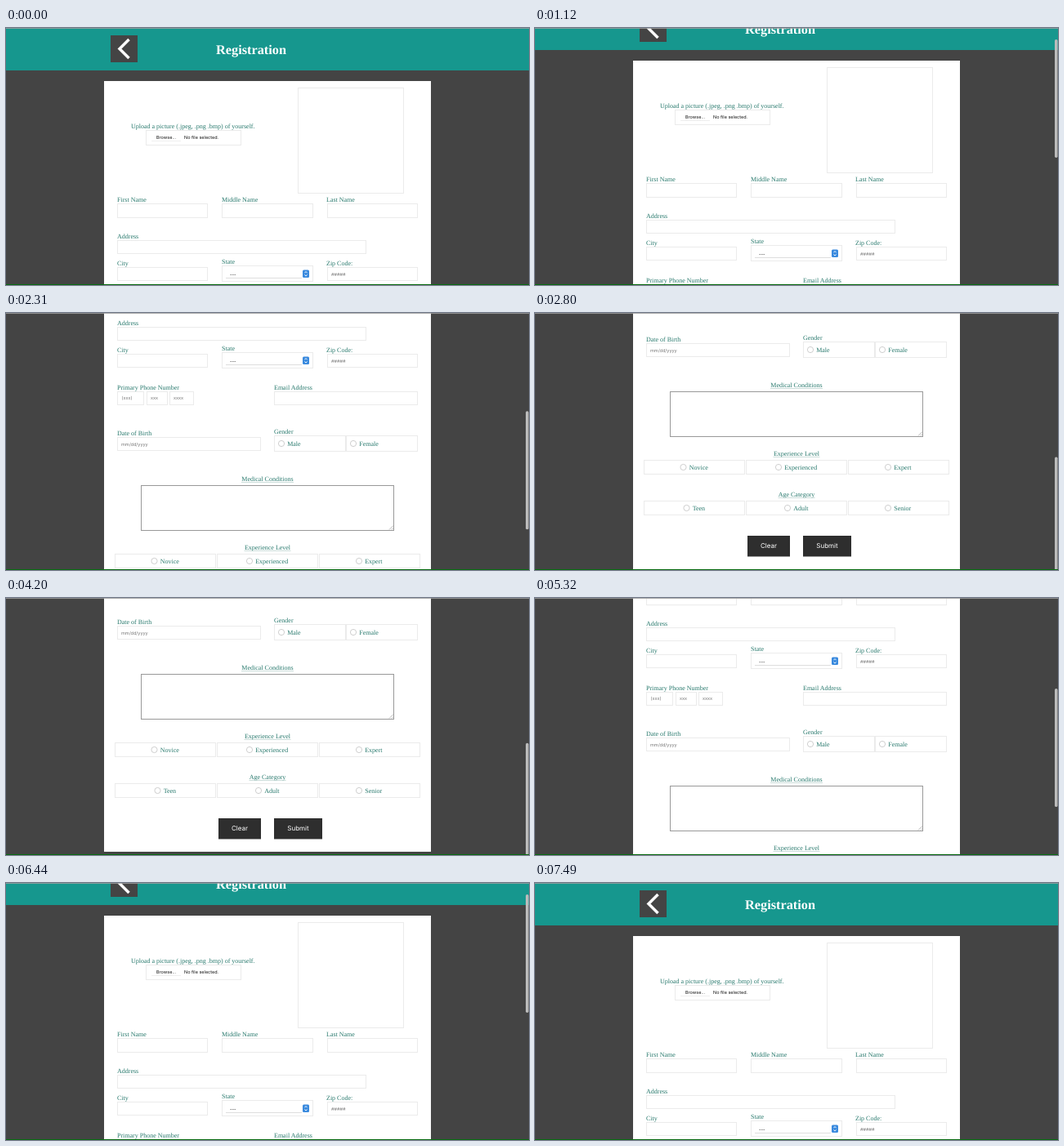
These frames come from a looping animation (640x315 px, 7560 ms). An HTML page:

```html
<!DOCTYPE html>
<html lang="en">
<head>
<meta charset="utf-8">
<title>Registration form</title>
<style>
  html, body { margin: 0; height: 100%; overflow: hidden; background: #444; }
  svg { display: block; width: 640px; height: 315px; text-rendering: geometricPrecision; }
  .label { font: 8px "Liberation Serif", serif; fill: #28796d; }
  .title { font: bold 16.3px "Liberation Serif", serif; fill: #fff; }
  .ui { font: 5.5px Inter, sans-serif; fill: #111; }
  .hint { font: 5.5px Inter, sans-serif; fill: #777; }
  .button { font: 8px Inter, sans-serif; fill: #fff; }
  .mid { text-anchor: middle; }
  .box { fill: none; stroke: #ebebeb; }
</style>
</head>
<body>
<svg viewBox="0 0 640 315">
  <rect width="640" height="315" fill="#444"/>
  <g id="page">
    <rect width="640" height="52" fill="#16978e"/>
    <rect x="128" y="9" width="33" height="33" fill="#444"/>
    <path d="M150.500 14 139 25.500 150.500 37" fill="none" stroke="#fff" stroke-width="3.500"/>
    <rect x="120" y="65" width="400" height="607" fill="#fff"/>
  </g>
  <rect id="thumb" x="636" width="3.500" height="145" rx="1.700" fill="#bcbcbc"/>
  <rect width="640" height="1" fill="#a0a0a0" opacity=".8"/>
  <rect y="314" width="640" height="1" fill="#086b10"/>
</svg>
<script>
const page = document.getElementById('page');
const thumb = document.getElementById('thumb');

function add(tag, attrs, content = '') {
  const el = document.createElementNS('http://www.w3.org/2000/svg', tag);
  for (const key in attrs) el.setAttribute(key, attrs[key]);
  el.textContent = content;
  page.append(el);
}
const text = (cls, x, y, content) => add('text', { class: cls, x, y }, content);
const label = (x, y, content) => text('label', x, y, content);
const hint = (x, y, content) => text('hint', x, y, content);
const box = (left, top, right, bottom, extra) => add('rect', {
  class: 'box', x: left + .5, y: top + .5, width: right - left - 1, height: bottom - top - 1, ...extra
});
const path = (d, stroke, width = 1) => add('path', { d, stroke, 'stroke-width': width, fill: 'none' });

function radio(x, y, name) {
  add('circle', { cx: x, cy: y, r: 3.6, fill: '#fff', stroke: '#bbb', 'stroke-width': .7 });
  label(x + 7.2, y + 3, name);
}
function heading(y, content, halfWidth) {
  text('label mid', 320, y, content);
  path(`M${320 - halfWidth} ${y + 1.5}h${halfWidth * 2}`, '#b5cfcb', .7);
}
function choices(top, items) {
  items.forEach(([x, name], i) => {
    box(133 + i * 125, top, 257 + i * 125, top + 18);
    radio(x, top + 9, name);
  });
}
function button(left, right, name) {
  add('rect', { x: left, y: 631, width: right - left, height: 25.5, fill: '#2e2e2e' });
  text('button mid', (left + right) / 2, 646.4, name);
}

text('title mid', 300, 32, 'Registration');

// Picture upload
label(153, 122.5, 'Upload a picture (.jpeg, .png .bmp) of yourself.');
box(171, 125, 288, 144);
path('M178 138.500h36', '#eee');
text('ui', 184, 136, 'Browse...');
text('ui', 218, 136, 'No file selected.');
box(357, 73, 487, 203);

// Name and address
[[136, 'First Name'], [264, 'Middle Name'], [392, 'Last Name']].forEach(([x, name], i) => {
  label(x, 213, name);
  box([136, 264, 393][i], 215, [247, 376, 504][i], 233);
});
label(136, 257.5, 'Address');
box(136, 260, 441, 277);
label(136, 290.5, 'City');
box(136, 293, 247, 310);
label(264, 288.8, 'State');
box(264, 291, 376, 311);
path('M269 306.500h93', '#ddd');
text('ui', 274, 303.5, '---');
add('rect', { x: 363, y: 296.5, width: 8, height: 9.5, rx: 1.5, fill: '#3a8ade' });
path('M365.500 300.200l1.500-1.700 1.500 1.700M365.500 302.400l1.500 1.700 1.500-1.700', '#fff', .9);
label(392, 290.5, 'Zip Code:');
box(393, 293, 504, 310);
hint(398, 303.7, '#####');

// Contact
label(136, 336.7, 'Primary Phone Number');
[[136, 169, 141.5, '(xxx)'], [172, 198, 177, 'xxx'], [200, 230, 205, 'xxxx']].forEach(([left, right, x, name]) => {
  box(left, 339, right, 356);
  hint(x, 349.2, name);
});
label(328, 336.7, 'Email Address');
box(328, 339, 504, 356);

// Personal details
label(136, 392.7, 'Date of Birth');
box(136, 395, 312, 412);
hint(141, 405.5, 'mm/dd/yyyy');
label(328, 391.2, 'Gender');
box(328, 393, 416, 413);
box(416, 393, 504, 413);
radio(337, 403, 'Male');
radio(425, 403, 'Female');

heading(449, 'Medical Conditions', 32);
box(165, 454, 475, 510, { style: 'stroke:#999' });
path('M469 508.500l5-5M472 508.500l2-2', '#999', .7);

heading(533, 'Experience Level', 28.5);
choices(538, [[181.5, 'Novice'], [298, 'Experienced'], [432, 'Expert']]);
heading(583, 'Age Category', 22.5);
choices(588, [[185.5, 'Teen'], [309, 'Adult'], [432, 'Senior']]);
button(260, 312, 'Clear');
button(328, 387, 'Submit');

// Scroll keys: time in ms, offset in px, speed in px per ms
const LOOP = 7560, STEP = 70;
const keys = [
  [0, 0, 0], [840, 0, .05], [1120, 24.5, .08], [1610, 52, .08], [2310, 243, .31], [2870, 361, 0],
  [4690, 361, 0], [5320, 224, -.24], [6440, 24.5, -.12], [6720, 0, 0], [LOOP, 0, 0]
];
function scrollAt(t) {
  const i = keys.findIndex(key => key[0] > t);
  const [t0, y0, v0] = keys[i - 1], [t1, y1, v1] = keys[i];
  if (y0 === y1) return y0;
  const d = t1 - t0, u = (t - t0) / d, w = 1 - u;
  return w * w * ((1 + 2 * u) * y0 + u * d * v0) + u * u * ((3 - 2 * u) * y1 - w * d * v1);
}

function draw(now) {
  const t = Math.floor(now % LOOP / STEP) * STEP;
  const y = scrollAt(t);
  page.setAttribute('transform', `translate(0 ${-Math.round(y)})`);
  thumb.setAttribute('y', 2 + y * .487);
  thumb.setAttribute('opacity', t < 910 ? 0 : Math.max(0, Math.min(1, (7000 - t) / 210)));
}
const start = performance.now();
function tick() {
  draw(performance.now() - start);
  requestAnimationFrame(tick);
}
tick();
</script>
</body>
</html>
```
